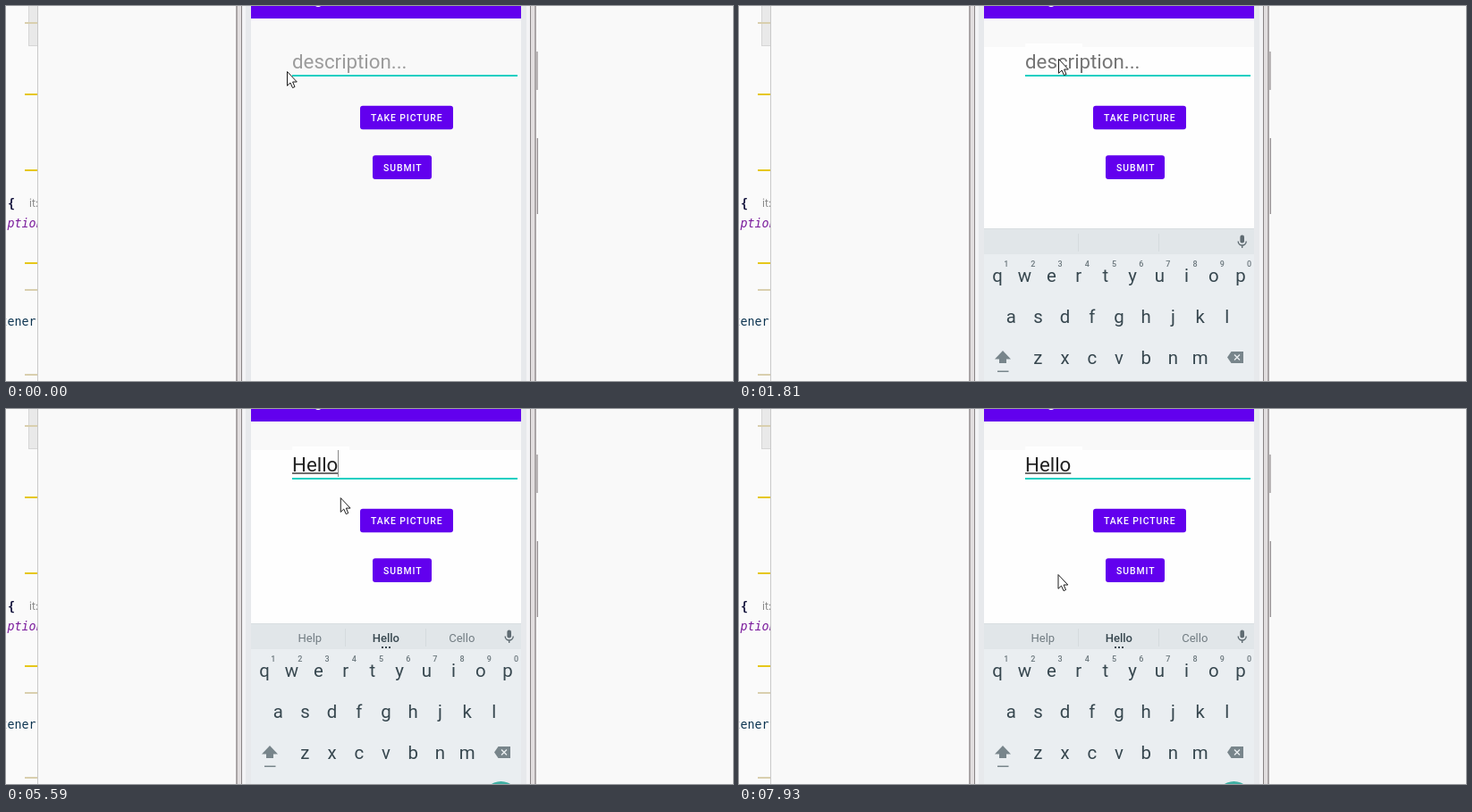
Write an HTML page with a canvas that moves like this. It is 813 by 420 pixels and loops after 8 s.

```html
<!DOCTYPE html>
<html lang="en">
<head>
<meta charset="utf-8">
<title>Form input</title>
<style>
html, body { margin: 0; width: 100%; height: 100%; overflow: hidden; background: #f9f9f9; }
canvas { display: block; }
</style>
</head>
<body>
<canvas id="stage" width="813" height="420"></canvas>
<script>
const c = document.getElementById('stage').getContext('2d');
const LOOP = 8000, TICK = 139, LEAD = 30; // the screen refreshes once per tick
const TEAL = '#14cfc2', PURPLE = '#6200ee', WHITE = '#fefefe', KEY = '#37474f', ICON = '#78858b';
const LEFT = 274, WIDTH = 302, RIGHT = LEFT + WIDTH;
const SANS = 'Roboto, sans-serif';

// Ticks
const SHOW_KEYS = 12, PRESS = 45;
const keystrokes = [24, 27, 29, 30, 32];
const pointerPath = [
  [5, 314, 73], [8, 372, 42], [12, 357, 60], [13, 357, 59], [15, 349, 59], [17, 349, 59],
  [20, 343.5, 56.5], [38, 343.5, 56.5], [43, 429.5, 177.5], [46, 429.5, 177.5],
  [48, 405, 178], [56, 405, 178], [57, 356.5, 185]
];
const suggestions = [
  [], ['Hi', 'H', 'How'], ['Her', 'He', 'Hey'], ['Help', 'Hel', 'Hello'],
  ["He'll", 'Hell', 'Hello'], ['Help', 'Hello', 'Cello']
];

const typedCount = n => keystrokes.filter(k => k <= n).length;

function pointerAt(n) {
  const i = pointerPath.findIndex(p => p[0] > n);
  if (i < 0) return pointerPath.at(-1).slice(1);
  if (i === 0) return pointerPath[0].slice(1);
  const [a, ax, ay] = pointerPath[i - 1], [b, bx, by] = pointerPath[i];
  const u = (n - a) / (b - a), e = u * u * (3 - 2 * u);
  return [ax + (bx - ax) * e, ay + (by - ay) * e];
}

function caretOn(n) {
  const first = keystrokes[0], last = keystrokes.at(-1);
  if (n < first) return n > 0 && (n - 1) % 7 < 3;
  return n < last || (n - last) % 7 < 4;
}

function rect(x, y, w, h, color) {
  c.fillStyle = color;
  c.fillRect(x, y, w, h);
}

function round(x, y, w, h, r, color) {
  c.beginPath();
  c.roundRect(x, y, w, h, r);
  c.fillStyle = color;
  c.fill();
}

function disc(x, y, r, color) {
  c.beginPath();
  c.arc(x, y, r, 0, 7);
  c.fillStyle = color;
  c.fill();
}

function text(s, x, y, font, color, align = 'left', spacing = 0) {
  c.font = font;
  c.fillStyle = color;
  c.textAlign = align;
  c.letterSpacing = spacing + 'px';
  c.fillText(s, x, y);
}

function shape(path, x, y, fill, stroke) {
  const p = new Path2D(path);
  c.save();
  c.translate(x, y);
  if (fill) {
    c.fillStyle = fill;
    c.fill(p);
  }
  if (stroke) {
    c.strokeStyle = stroke;
    c.lineWidth = fill ? 1 : 1.4;
    c.stroke(p);
  }
  c.restore();
}

function clip(x, y, w, h, r = 0) {
  c.save();
  c.beginPath();
  c.roundRect(x, y, w, h, r);
  c.clip();
}

function editor() {
  const mono = '13.3px "DejaVu Sans Mono", monospace';
  clip(0, 0, 35, 420);
  rect(0, 0, 35, 420, '#fafafa');
  rect(25, 0, 10, 45, '#d6d6d6');
  rect(26, 0, 9, 44, '#e9e9e9');
  for (const y of [18, 317, 412]) rect(21, y, 14, 2, '#d9cfae');
  for (const y of [98, 183, 287]) rect(21, y, 14, 2, '#e6c71a');
  text('{', 2, 226, 'bold ' + mono, '#14143c');
  text('it:', 26, 225, '12px Inter, sans-serif', '#868686');
  text('iption', -6.5, 248, 'italic ' + mono, '#7a1a9c');
  text('tener', -6.5, 358, mono, '#0b3350');
  c.restore();
  rect(35, 0, 1, 420, '#c9c9c9');
}

function phone() {
  // Side buttons
  rect(593, 51, 2, 43, '#b9b5b6');
  rect(593, 148, 1, 85, '#e0dcdd');
  rect(594, 148, 1, 85, '#918d8e');
  // Bezel, mirrored outward from the screen edges
  const bezel = [[0, 6, '#e7e9ec'], [6, 4, '#f3f3f5'], [10, 1, '#888384'], [11, 4, '#e2dedf'], [15, 2, '#aaa5a6']];
  for (const [out, w, color] of bezel) {
    rect(LEFT - out - w, 0, w, 420, color);
    rect(RIGHT + out, 0, w, 420, color);
  }
}

function button(label, y, w, press = -1) {
  const x = 448 - w / 2 - (w < 80 ? 5 : 0), h = 26.6;
  const pressed = press >= 0 && press < 3;
  c.save();
  if (pressed) {
    c.shadowColor = 'rgba(0,0,0,.35)';
    c.shadowBlur = 4;
    c.shadowOffsetY = 1.5;
  }
  round(x, y, w, h, 3, PURPLE);
  c.restore();
  text(label, x + 12, y + 17.3, '500 10.4px ' + SANS, '#fff', 'left', 0.93);
  if (!pressed) return;
  clip(x, y, w, h, 3);
  disc(430, 180, 42 + 38 * press, `rgba(255,255,255,${0.12 * Math.min(2, 3 - press)})`);
  c.restore();
}

function field(n) {
  const font = '22.3px ' + SANS;
  const value = 'Hello'.slice(0, typedCount(n));
  let end = 320;
  if (value) {
    text(value, 320, 70, font, '#212121');
    const w = c.measureText(value).width;
    end = Math.floor(320 + w);
    rect(320, 71.3, w, 1.4, '#333');
  } else {
    const opening = n > SHOW_KEYS && n < SHOW_KEYS + 3;
    text('description...', 320, 70, font, opening ? '#757575' : '#9c9c9c');
  }
  rect(320, 77, 252, 2, TEAL);
  if (caretOn(n)) rect(end, 46, value ? 1 : 2, 30, value ? '#8a8a8a' : TEAL);
}

function keyboard(n) {
  const age = n - SHOW_KEYS;
  if (age < 0) return;
  const pitch = WIDTH / 10, keyX = i => LEFT + pitch * (i + 0.5);
  c.save();
  c.globalAlpha = Math.min(1, 0.45 + age);
  c.translate(0, Math.round(240 + 142 * 0.063 ** age));
  rect(LEFT, 0, WIDTH, 200, '#eaeef1');
  rect(LEFT, 0, WIDTH, 29, '#e1e6e9');
  rect(LEFT, 0, WIDTH, 1, '#d9dee1');
  for (const x of [379, 469]) rect(x, 6, 1, 20, '#d5dbde');

  // Microphone
  round(560.4, 7.5, 4.6, 9, 2.3, '#5f6b72');
  shape('M-4.5 0A4.5 4.5 0 0 0 4.5 0M0 4.5V7.5', 562.7, 14.5, null, '#5f6b72');

  suggestions[typedCount(n)].forEach((word, i) => {
    const mid = i === 1;
    text(word, 339.8 + 85 * i, 20.5, (mid ? '500 ' : '') + '13px ' + SANS, mid ? KEY : '#717c82', 'center');
    if (mid) for (let d = 0; d < 3; d++) rect(420 + 4 * d, 26, 2, 2, KEY);
  });

  ['qwertyuiop', 'asdfghjkl', 'zxcvbnm'].forEach((row, j) => {
    [...row].forEach((k, i) => text(k, keyX(i + j / 2 * (j > 1 ? 1.5 : 1)), 59.5 + 46 * j, '20.4px ' + SANS, KEY, 'center'));
  });
  for (let i = 0; i < 10; i++)
    text((i + 1) % 10, keyX(i) + 9.6, 43, '500 9px ' + SANS, '#6b777d', 'center');

  shape('M0 0L9 9.5H4V14H-4V9.5H-9ZM-6 22.5H6.5V24H-6Z', 295, 137, ICON);
  shape('M0 6.5L4.5 0H18V13H4.5Z', 546, 138, ICON);
  shape('M0 0L6 6M6 0L0 6', 554, 141.5, null, '#eaeef1');
  disc(553.5, 197, 20, '#41b0a4');
  c.restore();
}

function draw(t) {
  const n = Math.floor((t + LEAD) / TICK);
  rect(0, 0, 813, 420, '#f9f9f9');
  editor();
  phone();
  clip(LEFT, 0, WIDTH, 420);
  if (n >= 8) rect(320, 42, 64, 37, WHITE);
  if (n >= SHOW_KEYS) rect(LEFT, 46, WIDTH, 374, WHITE);
  rect(LEFT, 0, WIDTH, 14, PURPLE);
  text('g', 344.5, -2, '500 17px ' + SANS, '#fff');
  field(n);
  button('TAKE PICTURE', 111.7, 104);
  button('SUBMIT', 167.3, 66, n - PRESS);
  keyboard(n);
  c.restore();
  shape('M.5 .5V16.3L4 13L6.5 18.6L9 17.5L6.6 12H11.3Z', ...pointerAt(n), '#fff', '#1c1c1c');
}

const start = performance.now();
function frame() {
  draw((performance.now() - start) % LOOP);
  requestAnimationFrame(frame);
}
frame();
</script>
</body>
</html>
```
